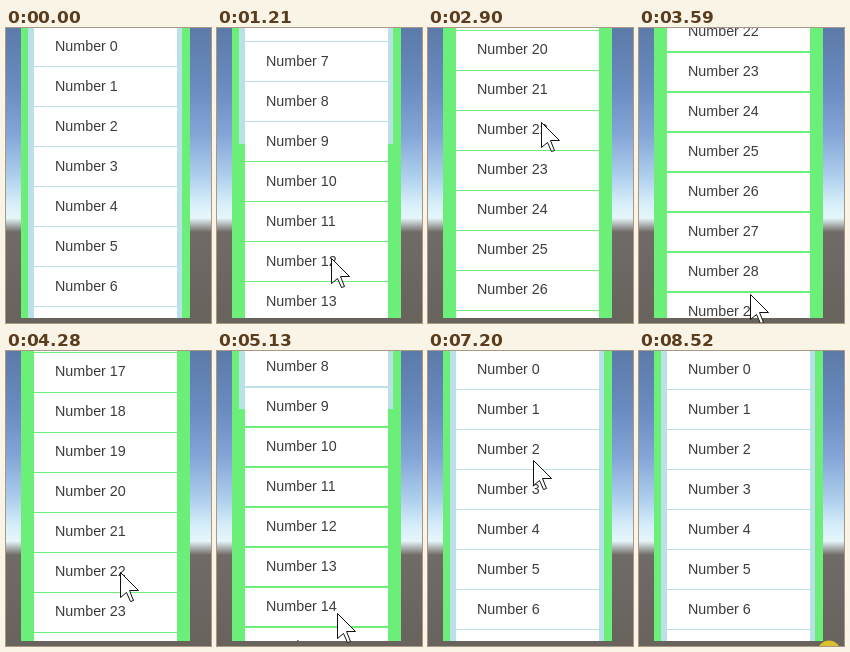
Write an HTML page with a canvas that moves like this. It is 205x295 px and loops after 8590 ms.

```html
<!DOCTYPE html>
<html lang="en">
<head>
<meta charset="utf-8">
<title>Scrolling list</title>
<style>
html, body { margin: 0; width: 100%; height: 100%; overflow: hidden; background: #69635e; }
canvas { display: block; }
</style>
</head>
<body>
<canvas id="stage" width="205" height="295"></canvas>
<script>
const ctx = document.getElementById('stage').getContext('2d');
const LOOP = 8590, PITCH = 40, GAP = 1.2, VIEW = 290, PANEL_HEIGHT = 381;
const CURSOR_IN = 200, CURSOR_OUT = 7700;

// Each gesture eases the list to `scroll` while the hand moves from `grab` to `drop`
const gestures = [
  { from: 200, to: 500, scroll: 0, grab: 300, drop: 265 },
  { from: 500, to: 1350, scroll: 272, grab: 255, drop: 75 },
  { from: 1350, to: 2200, scroll: 544.3, grab: 255, drop: 65 },
  { from: 2290, to: 3590, scroll: 894.6, grab: 249, drop: 65 },
  { from: 3600, to: 3800, scroll: 894.6, grab: 266, drop: 60 },
  { from: 3800, to: 4780, scroll: 601, grab: 60, drop: 256 },
  { from: 4780, to: 5970, scroll: 47.6, grab: 65, drop: 262 },
  { from: 6000, to: 6360, scroll: -75, grab: 65, drop: 230 },
  { from: 6600, to: 7000, scroll: 0, grab: 230, drop: 230 },
  { from: 7220, to: 7500, scroll: -60, grab: 108, drop: 235 },
  { from: 7500, to: 7970, scroll: 0, grab: 235, drop: 255 }
];

const mix = (a, b, u) => a + (b - a) * u;
const progress = (t, from, to) => Math.min(1, Math.max(0, (t - from) / (to - from)));
const easeOut = u => 1 - (1 - u) ** 2;
const smooth = u => u * u * (3 - 2 * u);

function scrollAt(t) {
  return gestures.reduce((s, g) => mix(s, g.scroll, easeOut(progress(t, g.from, g.to))), 0);
}

function cursorAt(t) {
  const i = gestures.findLastIndex(g => g.from <= t);
  const g = gestures[i], next = gestures[i + 1];
  const release = mix(g.from, g.to, 0.3);
  let y = mix(g.grab, g.drop, easeOut(progress(t, g.from, release)));
  if (next) y = mix(y, next.grab, smooth(progress(t, release, next.from)));
  const sway = 6 * (t / 5130) ** 2;
  return [114 + sway * Math.cos((t - 5130) / 3360 * Math.PI * 2), y];
}

function rect(color, x, y, w, h) {
  ctx.fillStyle = color;
  ctx.fillRect(x, y, w, h);
}

const sky = ctx.createLinearGradient(0, 0, 0, VIEW);
[[0, '#5c7aa9'], [60, '#6a8cc0'], [105, '#82a4d6'], [150, '#b0d0ee'], [175, '#d6eefa'],
 [190, '#e6f6fa'], [204, '#706b67'], [290, '#69635e']]
  .forEach(([y, color]) => sky.addColorStop(y / VIEW, color));

function drawList(scroll) {
  rect('#6cef79', 15, 0, 169, VIEW);
  const top = Math.round(-scroll), bottom = Math.round(PANEL_HEIGHT - scroll);
  rect('#bae0e8', 22, top, 154, bottom - top);

  ctx.font = '14.3px "Liberation Sans", Arial, sans-serif';
  const first = Math.max(0, Math.floor(scroll / PITCH) - 1);
  for (let n = first; n < first + 11; n++) {
    const y = n * PITCH - scroll;
    const cellTop = Math.round(y - 2 + GAP), cellEnd = Math.round(y + 38);
    rect('#fff', 28, cellTop, 143, cellEnd - cellTop);
    ctx.fillStyle = '#3c3c3c';
    ctx.fillText('Number ' + n, 49, Math.round(y + 22.6));
  }
}

function drawCursor([x, y]) {
  const outline = [[0, 0], [0, 25], [6, 20], [10, 29], [13, 28], [9, 18], [18, 18]];
  ctx.beginPath();
  outline.forEach(([dx, dy]) => ctx.lineTo(Math.round(x) + dx + 0.5, Math.round(y) + dy + 0.5));
  ctx.closePath();
  ctx.fillStyle = '#fff';
  ctx.fill();
  ctx.strokeStyle = '#111';
  ctx.lineWidth = 1;
  ctx.stroke();
}

function draw(t) {
  rect(sky, 0, 0, 205, 295);
  ctx.save();
  ctx.beginPath();
  ctx.rect(0, 0, 205, VIEW);
  ctx.clip();
  drawList(scrollAt(t));
  ctx.restore();
  if (t >= CURSOR_IN && t < CURSOR_OUT) drawCursor(cursorAt(t));
  if (t >= 8520) {
    ctx.beginPath();
    ctx.arc(190, 301, 11.5, 0, Math.PI * 2);
    ctx.fillStyle = '#d9c02c';
    ctx.fill();
  }
}

const start = performance.now();
function tick() {
  draw((performance.now() - start) % LOOP);
  requestAnimationFrame(tick);
}
tick();
</script>
</body>
</html>
```
